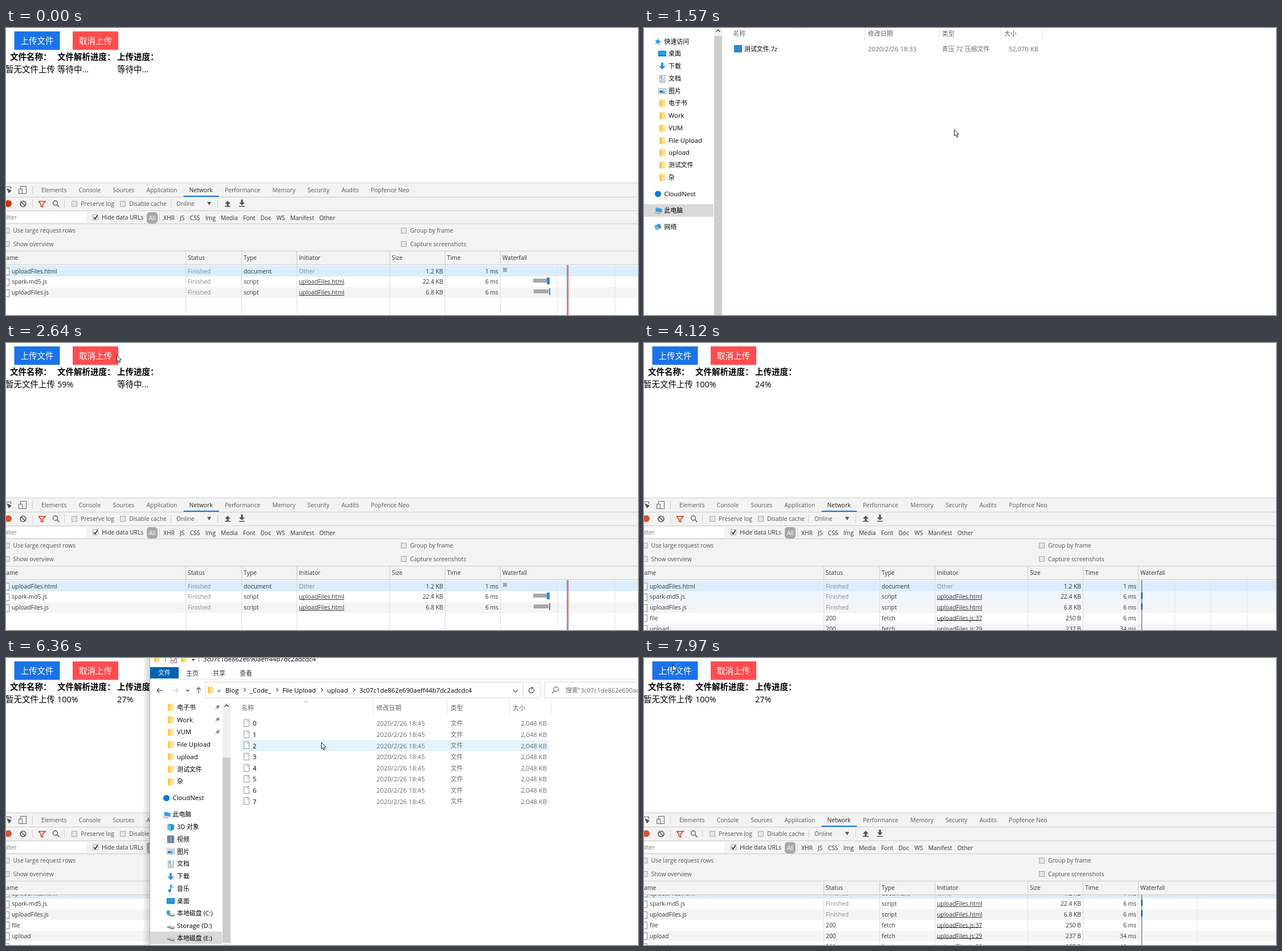
An HTML page with a canvas for the animation above (8000 ms loop, 1109 px wide and 505 px high).

```html
<!DOCTYPE html>
<html lang="zh-CN">
<head>
<meta charset="utf-8">
<title>文件上传</title>
<style>
html, body { margin: 0; width: 100%; height: 100%; overflow: hidden; background: #fff; }
canvas { display: block; width: 1109px; height: 505px; }
</style>
</head>
<body>
<canvas id="stage" width="1109" height="505"></canvas>
<script>
const W = 1109, H = 505, LOOP = 8000;
const ctx = document.getElementById('stage').getContext('2d');
const FONT = '"Open Sans", "Noto Sans CJK SC", "Noto Sans CJK", sans-serif';
const HASH = '3c07c1de862e690aeff44b7dc2adcdc4';
const GRAY = '#6d6d6d', DARK = '#333', MID = '#555', RULE = '#ccc', BLUE = '#1a8fe3';

// drawing helpers
function rect(x, y, w, h, fill) { ctx.fillStyle = fill; ctx.fillRect(x, y, w, h); }
function box(x, y, w, h, stroke, fill) {
  if (fill) rect(x, y, w, h, fill);
  ctx.strokeStyle = stroke; ctx.lineWidth = 1;
  ctx.strokeRect(x + .5, y + .5, w - 1, h - 1);
}
function trace(pts) {
  ctx.beginPath();
  for (let i = 0; i < pts.length; i += 2) ctx.lineTo(pts[i], pts[i + 1]);
}
function line(pts, color, width = 1) {
  trace(pts); ctx.strokeStyle = color; ctx.lineWidth = width; ctx.stroke();
}
function poly(pts, fill) { trace(pts); ctx.fillStyle = fill; ctx.fill(); }
function ring(x, y, r, color, width = 1, from = 0, to = Math.PI * 2) {
  ctx.beginPath(); ctx.arc(x, y, r, from, to);
  ctx.strokeStyle = color; ctx.lineWidth = width; ctx.stroke();
}
function dot(x, y, r, fill) { ctx.beginPath(); ctx.arc(x, y, r, 0, 7); ctx.fillStyle = fill; ctx.fill(); }
function blend(x0, y0, x1, y1, from, to) {
  const g = ctx.createLinearGradient(x0, y0, x1, y1);
  g.addColorStop(0, from); g.addColorStop(1, to);
  return g;
}
function at(x, y, draw) { ctx.save(); ctx.translate(x, y); draw(); ctx.restore(); }
function clip(x, y, w, h, draw) {
  ctx.save(); ctx.beginPath(); ctx.rect(x, y, w, h); ctx.clip(); draw(); ctx.restore();
}
function faded(alpha, draw) { ctx.save(); ctx.globalAlpha = alpha; draw(); ctx.restore(); }

// text, centred on y
function text(s, x, y, size, color = '#000', align = 'left', weight = 400) {
  ctx.font = `${weight} ${size}px ${FONT}`;
  ctx.fillStyle = color; ctx.textAlign = align;
  ctx.fillText(s, x, y + size * .37);
  return ctx.measureText(s).width;
}
const label = (s, x, y, color, align) => text(s, x, y, /[\u4e00-\u9fff]/.test(s) ? 10.9 : 11.3, color, align);
const small = (s, x, y, color = DARK, align) => text(s, x, y, 10.3, color, align);
function flow(names, x, y, gap, draw) {
  for (const n of names) x += draw(n, x, y) + gap;
}

// glyphs
function arrowhead(x, y, angle, size, color, width = 1.3) {
  at(x, y, () => { ctx.rotate(angle); line([-size / 2, -size, size / 2, 0, -size / 2, size], color, width); });
}
const RIGHT = 0, DOWN = Math.PI / 2, LEFT = Math.PI, UP = -Math.PI / 2;
function navArrow(x, y, angle, color = MID) {
  at(x, y, () => { ctx.rotate(angle); line([-5, 0, 5, 0], color, 1.3); arrowhead(3, 0, 0, 4, color); });
}
function fatArrow(x, y, angle, color, size = 6) {
  at(x, y, () => {
    ctx.rotate(angle);
    rect(-size, -size / 3, size, size / 1.5, color);
    poly([0, -size, size, 0, 0, size], color);
  });
}
function lens(x, y, color, flip = 1) {
  ring(x, y, 4, color, 1.3);
  line([x + 3 * flip, y + 3, x + 7 * flip, y + 7], color, 1.6);
}

// small icons, centred on the origin
const icons = {
  folder() {
    rect(-5, -6, 10, 12, '#ffe08c');
    poly([-5, -6, -1, -4, -1, 7, -5, 6], '#f5c95c');
  },
  star() {
    const pts = [];
    for (let i = 0; i < 10; i++) {
      const r = i % 2 ? 2.6 : 6.5, a = i * Math.PI / 5 - 1.35;
      pts.push(r * Math.cos(a), r * Math.sin(a));
    }
    poly(pts, '#2b9bea');
  },
  desk() { rect(-7, -5, 14, 10, '#0d78c9'); rect(-6, -4, 12, 7, '#1ba1f1'); },
  down() { fatArrow(0, 0, DOWN, '#2a93e0'); },
  doc() {
    box(-5, -6, 10, 13, '#8b98a3', '#fff');
    rect(-3, -4, 3, 3, '#4b92c7');
    for (let y = 0; y < 6; y += 2) rect(-3, y, 6, 1, '#7da7c5');
  },
  image() {
    box(-7, -5, 14, 10, '#9aa5ad', '#fff');
    rect(-5, -3, 10, 6, '#9bd0ee');
    poly([-5, 3, -5, 0, -2, -1, 5, 3], '#40779a');
  },
  cloud() { dot(0, 0, 5.5, '#0f78d4'); },
  pc() {
    poly([-4, -5, 7, -3, 7, 4, -4, 2], '#3c9ddd');
    line([-6, 4, 4, 6], '#9aa5ad', 1.5);
  },
  net() {
    poly([-6, -2, 3, -6, 6, 1, -2, 6], '#3c8dcc');
    dot(-2, 2, 3.5, '#76b9e6');
  },
  cube() {
    poly([-6, -4, 0, -6, 6, -4, 6, 4, 0, 7, -6, 4], '#2498d8');
    poly([-6, -4, 0, -2, 0, 7, -6, 4], '#66c4ef');
  },
  film() {
    rect(-6, -6, 12, 13, '#4a4e55');
    rect(-3, -5, 6, 11, '#6c9fce');
    for (let y = -5; y < 6; y += 3) { rect(-5, y, 1, 2, '#fff'); rect(4, y, 1, 2, '#fff'); }
  },
  note() { dot(-2, 4, 2.5, '#1c8de0'); line([0, 4, 0, -6, 4, -1], '#1c8de0', 1.6); },
  disk() {
    poly([-6, 1, -3, -1, 7, 2, 7, 4, 4, 6, -6, 3], '#7b8086');
    poly([-6, 1, -3, -1, 7, 2, 4, 4], '#c9cdd1');
  },
  sysDisk() { icons.disk(); rect(-7, -5, 6, 6, '#1ba1f1'); },
  archive() { rect(-7, -7, 14, 13, '#2f86c9'); },
  page() {
    box(-5, -7, 10, 13, '#999', '#fff');
    line([1.5, -6.5, 1.5, -3.5, 4.5, -3.5], '#aaa');
  },
  pin() { line([-4, 4, -1, 1], '#777'); poly([-3, -1, 1, 3, 4, -2, 2, -4], '#888'); }
};
const icon = (name, x, y) => at(x, y, icons[name]);

// pointer: rests at a point, then reaches the next in four 80 ms steps
const path = [
  [0, 665, 318], [350, 356, 164], [630, 47, 10], [1570, 544, 178], [1810, 300, 58], [2100, 200, 34],
  [2640, 194, 21], [3110, 172, 18], [3340, 310, 16], [4120, 0, 445], [5050, 2, 480], [5370, 593, 167],
  [6360, 553, 148], [6820, 1094, 2], [7200, 107, 95], [7520, 50, 11]
];
const MOVE = 320, STEPS = 4;
function pointer(t) {
  const hidden = t < 70 || (t >= 4120 && t < 5050);
  const i = path.findIndex(k => k[0] > t);
  const [t1, x1, y1] = path.at(i), [t0, x0, y0] = path.at(i < 0 ? -1 : i - 1);
  const span = Math.min(MOVE, t1 - t0) || 1;
  const u = Math.max(0, Math.floor((1 - (t1 - t) / span) * STEPS) / STEPS);
  const mix = (a, b) => Math.round(a + (b - a) * Math.min(1, u));
  return { x: mix(x0, x1), y: mix(y0, y1), hidden };
}

const WAIT = '等待中...';
const ticks = ms => Math.floor(ms / 77);
const parsed = t => t < 2400 ? WAIT : Math.min(100, 59 + 11 * ticks(t - 2640)) + '%';
const sent = t => t < 3110 ? WAIT : t >= 5050 ? '27%' : Math.min(24, 4 + 7 * ticks(t - 3110)) + '%';

// upload page
function button(s, x, fill) {
  rect(x, 6, 80, 32.5, fill);
  text(s, x + 40, 22.5, 14.5, '#fff', 'center');
}
function uploadPage(t) {
  rect(0, 0, W, H, '#fff');
  button('上传文件', 14.5, '#1a73e8');
  button('取消上传', 117, '#ff4d4f');
  const columns = [
    ['文件名称：', 7, '暂无文件上传', -1],
    ['文件解析进度：', 90, parsed(t), 90],
    ['上传进度：', 195, sent(t), 195]
  ];
  for (const [head, hx, value, vx] of columns) {
    text(head, hx, 51, 14.5, '#000', 'left', 700);
    text(value, vx, 72.5, 14.5);
  }
}

// developer tools
function check(s, x, y, on) {
  box(x, y - 5, 10, 10, '#a5a5a5', on ? '#fff' : '#e6e6e6');
  if (on) line([x + 2, y, x + 4.5, y + 3, x + 8.5, y - 3.5], DARK, 1.8);
  small(s, x + 16, y, on ? DARK : MID);
}
const divider = (x, y) => rect(x, y - 7, 1, 14, RULE);

function devBars(t) {
  rect(0, 272, W, 145, '#f3f3f3');
  for (const y of [272, 297, 321, 344, 392]) rect(0, y, W, 1, RULE);

  // tabs
  line([-1, 279.5, 8.5, 279.5, 8.5, 283], '#666', 1.2);
  poly([1, 282, 10, 286, 5, 291], MID);
  box(25, 278, 11, 14, '#666'); box(22, 283, 7, 9, '#666', '#f3f3f3');
  divider(46, 285);
  const tabs = 'Elements,Console,Sources,Application,Network,Performance,Memory,Security,Audits,Popfence Neo';
  flow(tabs.split(','), 62, 285, 21.3, (s, x, y) => {
    const active = s === 'Network', w = small(s, x, y, active ? '#222' : '#5a5a5a');
    if (active) rect(x - 10, 295, w + 21, 2, '#1a73e8');
    return w;
  });

  // toolbar
  if (t < 870) dot(4, 309, 7, '#f5d0c8');
  dot(4, 309, 6, t < 870 ? '#d0300f' : '#d9503a');
  ring(30, 309.5, 5, MID, 1.6); line([26.5, 306, 33.5, 313], MID, 1.6);
  line([57, 305, 69, 305, 64.5, 310, 64.5, 315, 61.5, 314, 61.5, 310, 57, 305], '#d23c1e', 1.6);
  lens(86.5, 308, MID);
  for (const x of [46, 102, 289, 371]) divider(x, 309);
  check('Preserve log', 115, 309.5); check('Disable cache', 200, 309.5);
  small('Online', 299, 309.5, MID);
  poly([353, 306, 360, 306, 356.5, 312], MID);
  fatArrow(389, 309, UP, MID, 5); rect(384, 313, 10, 1.5, MID);
  fatArrow(414, 307, DOWN, MID, 5); rect(409, 313, 10, 1.5, MID);

  // filters
  rect(0, 324, 141, 18, '#fff');
  small('Filter', -5.3, 333.5, '#777');
  check('Hide data URLs', 152, 333, true);
  ctx.beginPath(); ctx.roundRect(247, 324, 19, 20, 5); ctx.fillStyle = '#a8a8a8'; ctx.fill();
  small('All', 256.5, 334, '#fff', 'center');
  divider(269, 334);
  flow('XHR,JS,CSS,Img,Media,Font,Doc,WS,Manifest,Other'.split(','), 276, 334.5, 9.2, small0);

  check('Use large request rows', -3.5, 356.5); check('Group by frame', 693, 356.5);
  check('Show overview', -3.5, 380); check('Capture screenshots', 693, 380);
}
const small0 = (s, x, y) => small(s, x, y);

const columns = [-11.5, 315, 413, 510, 673, 770, 867];
const heads = 'Name,Status,Type,Initiator,Size,Time,Waterfall'.split(',');
const requests = [
  'uploadFiles.html|Finished|document|Other|1.2 KB|1 ms',
  'spark-md5.js|Finished|script|uploadFiles.html|22.4 KB|6 ms',
  'uploadFiles.js|Finished|script|uploadFiles.html|6.8 KB|6 ms',
  'file|200|fetch|uploadFiles.js:37|250 B|6 ms',
  'upload|200|fetch|uploadFiles.js:29|237 B|34 ms',
  'upload|200|fetch|uploadFiles.js:29|237 B|40 ms'
].map(r => r.split('|'));
const rowY = i => 427.7 + i * 18.9;

function requestRow(cells, i, fill) {
  const y = rowY(i);
  rect(0, y - 9.5, W, 19, fill);
  box(-6, Math.round(y) - 6, 12, 13, '#8c8c8c', '#fff');
  cells.forEach((s, c) => {
    const pale = s === 'Finished' || s === 'Other', color = pale ? '#888' : DARK;
    if (c === 0) small(s, 10, y);
    else if (c > 3) small(s, columns[c + 1] - 3, y, color, 'right');
    else {
      const w = small(s, columns[c] + 4, y, color);
      if (c === 3 && !pale) rect(columns[c] + 4, Math.round(y) + 4, w, 1, DARK);
    }
  });
}
function waterfall(late, scroll) {
  const [first, gap] = scroll ? [970, 103] : late ? [931, 63.5] : [967, 101];
  for (let x = first; x < W - 40; x += gap) rect(Math.floor(x), 417, 1, 88, '#dfe3e7');
  if (!late) rect(872, 422, 7, 7, '#a8a8a8');
  for (const i of [1, 2]) {
    const y = Math.round(rowY(i)) - scroll - 8;
    if (late) rect(872, y, 3, 11, BLUE);
    else {
      rect(924 + i, y + 2, 26, 7, '#a8a8a8');
      rect(945 + 4 * i, y, i === 1 ? 5 : 2, 12, BLUE);
    }
  }
  if (late) rect(873, 417, 1, 88, '#5a4550');
  else { rect(984, 417, 1.5, 88, '#3f8fe0'); rect(986, 417, 1, 88, '#d2504a'); }
}
function devTable(t) {
  const scroll = t >= 5050 ? 14 : 0, late = t >= 3110;
  const count = scroll ? 6 : late ? Math.min(5, 4 + ticks(t - 3110)) : 3;
  rect(0, 416, W, 1, RULE);
  rect(0, 417, W, 88, '#fff');
  clip(0, 417, W, 88, () => {
    at(0, -scroll, () => requests.slice(0, count).forEach((r, i) => {
      const hover = i === 1 && t >= 4050 && !scroll;
      requestRow(r, i, i === 0 ? '#dbedfd' : hover ? '#f0f6fe' : i % 2 ? '#fff' : '#f5f5f5');
    }));
    waterfall(late, scroll);
  });
  columns.forEach((x, i) => {
    small(heads[i], x + 4, 404.5);
    rect(x, 393, 1, 23, RULE); rect(x, 417, 1, 88, '#dcdcdc');
  });
}

// file browser parts, in the coordinates of the file picker
const quick = [
  ['快速访问', 'star', true], ['桌面', 'desk'], ['下载', 'down'], ['文档', 'doc'], ['图片', 'image'],
  ...['电子书', 'Work', 'VUM', 'File Upload', 'upload', '测试文件', '杂'].map(n => [n, 'folder']),
  ['CloudNest', 'cloud', true], ['此电脑', 'pc', true]
];
const drives = [
  ['3D 对象', 'cube'], ['视频', 'film'], ['图片', 'image'], ['文档', 'doc'], ['下载', 'down'], ['音乐', 'note'],
  ['桌面', 'desk'], ['本地磁盘 (C:)', 'sysDisk'], ['Storage (D:)', 'disk'], ['本地磁盘 (E:)', 'disk']
];
function sidebar(entries, selected, pinned) {
  let y = -5.5;
  entries.forEach(([name, kind, root], i) => {
    y += root ? 29 : 21.75;
    const x = root ? 35.5 : 43;
    if (name === selected) rect(-4, Math.round(y) - 11, 126, 22, '#d9d9d9');
    icon(kind, x - 11, Math.round(y));
    label(name, x, y);
    if (pinned && i > 0 && i < 8) icon('pin', 114, Math.round(y));
  });
}
function fileTable(files, p, selected) {
  const seps = [150, 387, 517, 626, 699];
  arrowhead(269, -1, UP, 3, '#888', 1);
  '名称,修改日期,类型,大小'.split(',').forEach((s, i) => label(s, seps[i] + 6, 9.7, '#5f6670'));
  for (const x of seps.slice(1)) rect(x, -3, 1, 24, '#e2e2e2');
  const over = p.x >= 154 && p.x < 696 ? Math.floor((p.y - 27) / 19.6) : -1;
  files.forEach(([name, kind, date, type, size], i) => {
    const y = 37.2 + i * 19.6;
    if (selected || i === over) rect(154, Math.round(y - 10), 542, 20, selected ? '#cce8ff' : '#e5f3ff');
    icon(kind, 165, Math.round(y));
    label(name, 176, y);
    label(date, 393, y, GRAY);
    label(type, 523, y, GRAY);
    label(size, 692, y, GRAY, 'right');
  });
}
const archive = [['测试文件.7z', 'archive', '2020/2/26 18:33', '青压 7Z 压缩文件', '52,070 KB']];
const chunks = Array.from({ length: 8 }, (_, i) => [String(i), 'page', '2020/2/26 18:45', '文件', '2,048 KB']);

function scrollbar(x, top, thumbTop, thumbEnd) {
  rect(x, top, 14, H - top, '#f0f0f0');
  rect(x, thumbTop, 14, thumbEnd - thumbTop, '#cdcdcd');
  arrowhead(x + 7, top + 5, UP, 3.5, '#444', 1.5);
}
function picker(t, p) {
  rect(0, 0, W, H, '#fff');
  sidebar([...quick, ['网络', 'net', true]], '此电脑');
  scrollbar(123, 0, 14, H);
  fileTable(archive, p, t >= 2100);
}

// explorer window
const SHIFT = 257;
function sheet(x) {
  const edge = [x, 4, x + 19, 8, x + 26, 16, x + 26, 71, x, 75, x, 4];
  poly(edge, '#fafafa'); line(edge, '#d4d4d4');
  line([x + 19, 8, x + 19, 16, x + 26, 16], '#c4c4c4');
}
function bigFolder(x, papers) {
  at(x, 91, () => {
    poly([17, 74, 52, 66, 56, 74], 'rgba(0,0,0,.06)');
    poly([0, 2, 47, 2, 47, 30, 51, 34, 51, 63, 17, 66], blend(17, 0, 50, 60, '#fbe094', '#f0c868'));
    if (papers) { sheet(30); sheet(17); }
    poly([0, 2, 17, 12, 17, 77, 0, 69], blend(0, 0, 17, 0, '#ffe7a4', '#f6d27a'));
  });
}
function tiles(t, p) {
  box(411, 82, 95, 106, '#99d1ff', '#cce8ff');
  const over = p.x >= 518 && p.x < 613 && p.y >= 82 && p.y < 217;
  if (over) rect(518, 82, 95, 135, t < 5590 ? '#e5f3ff' : '#cce8ff');
  bigFolder(429); bigFolder(536, true);
  label('__temp__', 458, 178.5, '#000', 'center');
  HASH.match(/.{1,13}/g).forEach((s, i) => label(s, 565, 178.5 + i * 14.5, '#000', 'center'));
}
function addressBar(open, title) {
  navArrow(270, 57, LEFT); navArrow(297, 57, RIGHT, RULE); navArrow(338, 57, UP);
  arrowhead(319, 57, DOWN, 3, MID);
  box(350, 42, 588, 29, '#d9d9d9', '#fff'); rect(907, 43, 1, 27, '#d9d9d9');
  icon('folder', 359, 56);
  const crumbs = open ? ['Blog', '_Code_', 'File Upload', 'upload', HASH]
    : ['此电脑', '本地磁盘 (E:)', 'OneDrive', 'Blog', '_Code_', 'File Upload', 'upload'];
  flow(crumbs, 385, 56.5, 19.7, (s, x, y) => {
    if (open && s === 'Blog') label('«', x - 14, y, '#444');
    else arrowhead(x - 9, 56, RIGHT, 3, MID, 1.2);
    return label(s, x, y);
  });
  arrowhead(894, 58, DOWN, 4, MID);
  ring(922, 57, 4.5, MID, 1.3, -.6, 4.6); poly([922, 50, 926, 53, 922, 55], MID);
  box(945, 42, 180, 29, '#d9d9d9', '#fff');
  lens(965, 55, '#777', -1);
  label(`搜索"${title}"`, 982, 56.5, GRAY);
}
function explorer(t, p) {
  const open = t >= 5670, title = open ? HASH : 'upload';
  rect(239, 0, 13, H, blend(239, 0, 252, 0, 'rgba(0,0,0,0)', 'rgba(0,0,0,.16)'));
  rect(252, 0, W - 252, H, '#fff');
  rect(252, 0, 1, H, '#b5b5b5');

  icon('folder', 265, 1); icon('folder', 312, 1);
  rect(279, 0, 1, 7, '#888'); rect(338, 0, 1, 7, '#888');
  box(289, -3, 11, 12, '#777', '#fff'); line([291, 3, 293.5, 6, 298, 0], '#d06030', 1.5);
  poly([325, 2, 332, 2, 328.5, 5], DARK);
  label(title, 346, 2);
  rect(253, 16, 50, 20, '#0063b1');
  label('文件', 278, 26, '#fff', 'center');
  ['主页', '共享', '查看'].forEach((s, i) => label(s, 316 + 47 * i, 26.5, DARK));
  rect(253, 37, W - 253, 1, '#e3e3e3');
  addressBar(open, title);

  clip(253, 76, 126, H - 76, () =>
    at(SHIFT, -45.5, () => sidebar([...quick, ...drives], '本地磁盘 (E:)', true)));
  scrollbar(380, 79, 175, 501);
  if (open) at(SHIFT, 78, () => fileTable(chunks, { x: p.x - SHIFT, y: p.y - 78 }));
  else tiles(t, p);
}

function cursor(p, busy) {
  at(p.x, p.y, () => {
    trace([.5, .5, .5, 12, 3, 9.7, 5, 14, 6.8, 13.2, 5, 9, 8.3, 8.7]);
    ctx.closePath();
    ctx.fillStyle = '#fff'; ctx.fill();
    ctx.strokeStyle = '#222'; ctx.lineWidth = 1; ctx.stroke();
    if (busy) ring(10.5, 3, 4, '#1d9ae8', 2);
  });
}

// opacity of a window that appears and disappears through a half-faded step
const presence = (t, from, to) => t < from || t >= to + 80 ? 0 : t < from + 70 || t >= to ? .5 : 1;

function render(t) {
  const p = pointer(t);
  uploadPage(t);
  devBars(t);
  devTable(t);
  faded(1, () => {
    const pick = presence(t, 1020, 2340), browse = presence(t, 4820, 6820);
    if (pick) faded(pick, () => picker(t, p));
    if (browse) faded(browse, () => explorer(t, p));
  });
  if (!p.hidden) cursor(p, t >= 7970);
}

const start = performance.now();
function tick() {
  render((performance.now() - start) % LOOP);
  requestAnimationFrame(tick);
}
tick();
</script>
</body>
</html>
```
